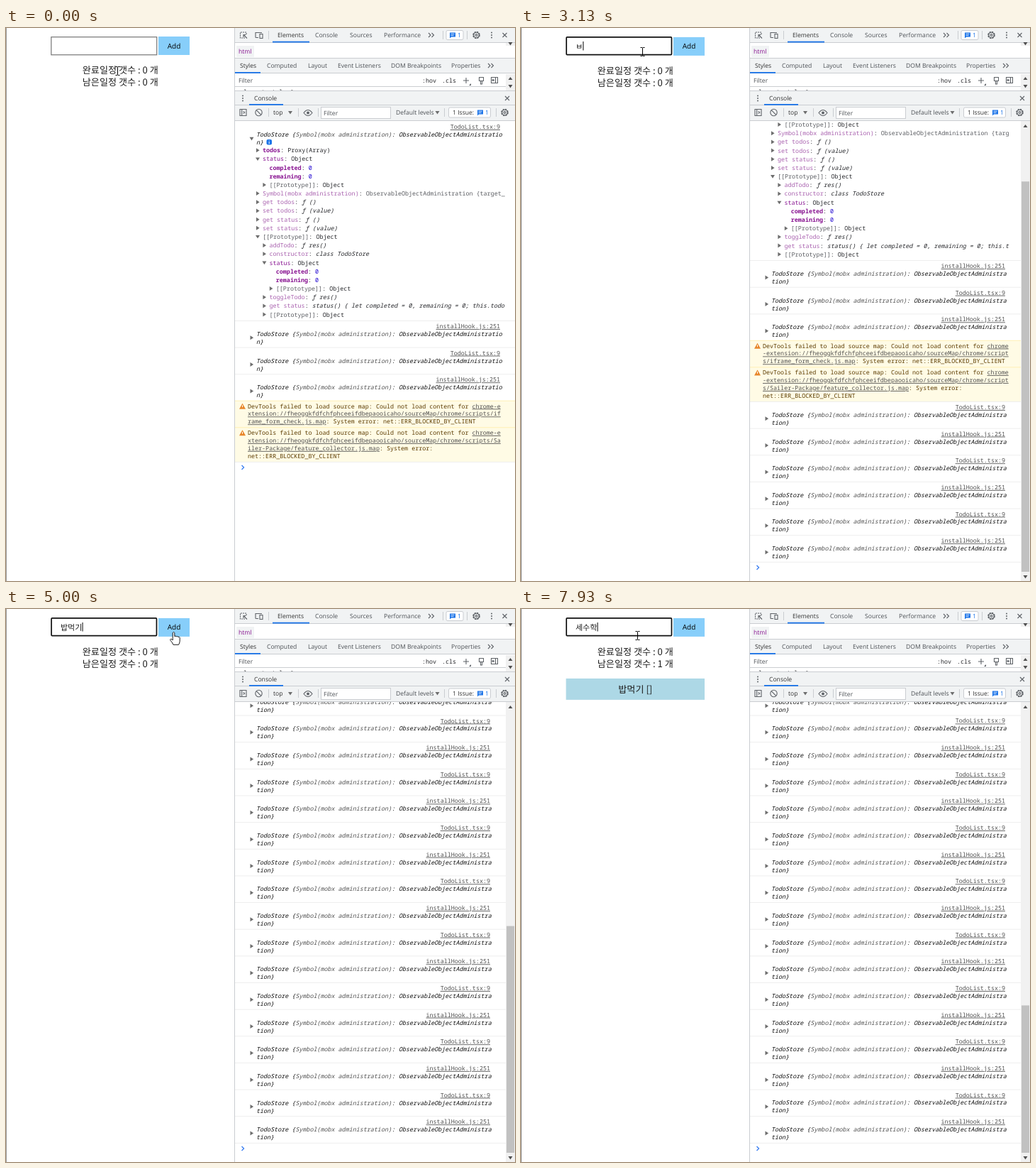
Animation, 718 px wide and 779 px high, one loop 8 s. Source, as an HTML page:

```html
<!DOCTYPE html>
<html lang="en">
<head>
<meta charset="utf-8">
<title>Todo list with console</title>
<style>
html, body { margin: 0; width: 100%; height: 100%; overflow: hidden; background: #fff; }
svg { display: block; }
text { white-space: pre; text-rendering: geometricPrecision; }
.ui { font: 8.6px "Open Sans", "Noto Sans", sans-serif; fill: #4d5156; }
.on { fill: #333; }
.mono { font: 8.38px "Noto Sans Mono", "DejaVu Sans Mono", monospace; fill: #26272b; }
.it { font-style: italic; fill: #111; }
.it .g { fill: #505050; }
.k { font-weight: 700; fill: #881391; }
.d { fill: #a962af; }
.p { fill: #881391; }
.g { fill: #5c5e63; }
.n { fill: #1c00cf; }
.i { font-style: italic; }
.a { text-decoration: underline; text-decoration-skip-ink: none; fill: #505050; }
.warn { fill: #5c3c00; }
.ko { font-family: "Noto Sans CJK KR", "Noto Sans CJK JP", "Noto Sans CJK SC", "Noto Sans CJK", sans-serif; font-weight: 350; fill: #1c1c1c; }
.ic { fill: none; stroke: #5f6368; stroke-width: 1.1; }
.hair { stroke: #cacdd1; stroke-width: 1; }
</style>
</head>
<body>
<svg id="stage" width="718" height="779" viewBox="0 0 718 779" xmlns="http://www.w3.org/2000/svg"></svg>
<script>
const LOG = 37.65, VIEW = 646, MAX_LOGS = 38;

const rect = (x, y, w, h, fill, more = '') =>
  `<rect x="${x}" y="${y}" width="${w}" height="${h}" fill="${fill}" ${more}/>`;
const text = (cls, x, cy, s, more = '') =>
  `<text class="${cls}" x="${x}" y="${cy + 3}" ${more}>${s}</text>`;
const line = (x1, y1, x2, y2, more = 'class="hair"') =>
  `<line x1="${x1}" y1="${y1}" x2="${x2}" y2="${y2}" ${more}/>`;
const icon = (d, more = '') => `<path class="ic" d="${d}" ${more}/>`;
const span = (cls, s) => `<tspan class="${cls}">${s}</tspan>`;
const END = 'text-anchor="end"', MID = 'text-anchor="middle"';

const right = (x, y) => `<path d="M${x - 2} ${y - 3}l4.6 3l-4.6 3z" fill="#6e6e6e"/>`;
const down = (x, y, c = '#6e6e6e') => `<path d="M${x - 3} ${y - 2}h6l-3 4.6z" fill="${c}"/>`;
const up = (x, y) => `<path d="M${x - 3} ${y + 2}h6l-3 -4z" fill="#505050"/>`;
const cross = (x, y) => icon(`M${x - 3} ${y - 3}l6 6m0 -6l-6 6`);
const more = (x, y) => [-3.5, 0, 3.5].map(d => `<circle cx="${x}" cy="${y + d}" r="1" fill="#5f6368"/>`).join('');
const chevrons = (x, y) => icon(`M${x - 4} ${y - 3}l3 3l-3 3m4.5 -6l3 3l-3 3`);
const gear = (x, y) =>
  `<circle class="ic" cx="${x}" cy="${y}" r="4.4" style="stroke-width:1.8;stroke-dasharray:2.3 1.15"/>` +
  `<circle class="ic" cx="${x}" cy="${y}" r="3.7"/><circle class="ic" cx="${x}" cy="${y}" r="1.4"/>`;
const bubble = (x, y) => `<path d="M${x - 4} ${y - 3.5}h8v6h-6l-2 2z" fill="#1a73e8"/>` +
  line(x - 2.5, y - 1.7, x + 2.5, y - 1.7, 'stroke="#fff" stroke-width=".8"') +
  line(x - 2.5, y + .4, x + 1.5, y + .4, 'stroke="#fff" stroke-width=".8"');

function header() {
  const label = (x, y, s, cls = 'ui') => text(cls, x, y, s);
  const seps = [[370, 10], [616, 10], [650, 10], [370, 119], [412, 119], [440, 119], [618, 119], [691, 119]];
  return rect(323, 0, 395, 20, '#f1f3f4') + line(323, 20.5, 718, 20.5) +
    rect(705, 21, 13, 4, '#f1f1f1') + down(711.5, 22, '#505050') +
    rect(325, 25, 25, 16, '#f1f3f4') + label(328, 33, span('p', 'html')) +
    line(323, 42.5, 718, 42.5) + rect(323, 43, 395, 20, '#f1f3f4') + line(323, 63.5, 718, 63.5) +
    rect(323, 89, 395, 41, '#f1f3f4') + line(323, 88.5, 718, 88.5) +
    line(323, 108.5, 718, 108.5) + line(323, 130.5, 718, 130.5) +
    seps.map(([x, y]) => line(x + .5, y - 6, x + .5, y + 6)).join('') +
    // main tabs
    icon('M337 14h-6.500v-8h8.500v3', 'stroke-dasharray="2 1"') + icon('M335 9.500l5 5m-5 -1.500v-3.500h3.500') +
    icon('M352 13.500v-7h9m-9 7h4') + rect(358, 8.500, 4, 6, 'none', 'class="ic"') +
    label(383, 10, 'Elements', 'ui on') + label(436, 10, 'Console') + label(485, 10, 'Sources') +
    label(533, 10, 'Performance') + chevrons(600, 10) + rect(376, 18.700, 52, 1.800, '#1a73e8') +
    rect(621, 3.500, 24, 13, '#fff', 'class="hair" rx="2"') + bubble(630, 10) +
    label(637, 10, '<tspan fill="#1a73e8">1</tspan>') + gear(663.500, 10) + more(685, 10) + cross(703.500, 10) +
    // sidebar tabs
    label(330, 53, 'Styles', 'ui on') + rect(323, 62, 36, 1.800, '#1a73e8') +
    label(368, 53, 'Computed') + label(426, 53, 'Layout') + label(468, 53, 'Event Listeners') +
    label(543, 53, 'DOM Breakpoints') + label(628, 53, 'Properties') + chevrons(684, 53) +
    // style filter
    label(328, 73.500, 'Filter') + line(323, 82.500, 705, 82.500) +
    label(587, 73.500, ':hov', 'mono') + label(615, 73.500, '.cls', 'mono') +
    icon('M645 74h8m-4 -4v8') + '<path d="M656 78v3h-3z" fill="#5f6368"/>' +
    icon('M667.500 69.500h6v5h-6zM669.500 75v4h2v-4') + icon('M684.500 69.500h9v8h-9zM690.500 69.500v8m-1.500 -4h-3m1.500 -1.500l-1.500 1.500l1.500 1.500') +
    rect(705, 65, 13, 23, '#f1f1f1') + up(711.500, 71) + down(711.500, 82, '#505050') +
    `<g clip-path="url(#peek)">${text('mono', 330, 90, 'element.style {')}</g>` +
    // drawer
    more(334, 99) + label(350, 99, 'Console', 'ui on') + rect(343, 107, 48, 1.800, '#1a73e8') + cross(707, 99) +
    icon('M330 114.500h9v9h-9zM332.700 114.500v9m2 -6l2 1.500l-2 1.500') +
    '<circle class="ic" cx="356.500" cy="119" r="4.700"/>' + icon('M353.200 115.700l6.600 6.600') +
    label(377, 119, 'top', 'ui on') + down(401, 119) +
    icon('M420 119.500q6 -8 12 0q-6 8 -12 0z') + '<circle cx="426" cy="119.500" r="2" fill="#5f6368"/>' +
    rect(444.500, 111.500, 98, 16, '#fff', 'class="hair"') + label(448, 119.500, 'Filter') +
    label(550, 119, 'Default levels') + down(608.500, 119) +
    rect(624.500, 112, 59, 14, '#fff', 'class="hair" rx="2"') + label(630, 119, '1 Issue:', 'ui on') +
    bubble(669, 119) + label(676, 119, '<tspan fill="#1a73e8">1</tspan>') + gear(703.500, 119);
}

// [level, arrow, content]; arrow: 0 none, 1 closed, 2 open
const treeRows = wide => {
  const num = s => span('k', s) + ': ' + span('n', '0');
  const proto = span('g', '[[Prototype]]') + ': Object';
  const fn = (name, s) => span('d', name) + ': ' + span('i', 'ƒ ' + s);
  const status = span('p', 'status') + ': Object';
  return [
    [0, 1, span('k', 'todos') + ': Proxy(Array)'],
    [0, 2, status], [1, 0, num('completed')], [1, 0, num('remaining')], [1, 1, proto],
    [0, 1, span('d', 'Symbol(mobx administration)') + ': ' +
      span('g', 'ObservableObjectAdministration {targ' + (wide ? 'et_' : ''))],
    [0, 1, fn('get todos', '()')], [0, 1, fn('set todos', '(value)')],
    [0, 1, fn('get status', '()')], [0, 1, fn('set status', '(value)')],
    [0, 2, proto],
    [1, 1, fn('addTodo', 'res()')],
    [1, 1, span('d', 'constructor') + ': ' + span('i', 'class TodoStore')],
    [1, 2, status], [2, 0, num('completed')], [2, 0, num('remaining')], [2, 1, proto],
    [1, 1, fn('toggleTodo', 'res()')],
    [1, 1, span('d', 'get status') + ': ' +
      span('i', 'status() { let completed = 0, remaining = 0; this.t' + (wide ? 'odo' : ''))],
    [1, 1, proto],
  ];
};

function store(y, wide, file, open) {
  const cut = wide ? 13 : 10, word = 'Administration';
  return text('mono a', wide ? 697 : 683, y + 7.7, file, END) +
    text('mono it', 353, y + 18.6, 'TodoStore {' + span('g', 'Symbol(mobx administration)') +
      ': ObservableObject' + word.slice(0, cut)) +
    text('mono it', 353, y + 29.6, word.slice(cut) + '}') +
    (open ? down(346.5, y + 24.5) : right(346.5, y + 24)) +
    (open ? '' : line(323, y + .2, wide ? 718 : 705, y + .2, 'stroke="#eee"'));
}

function warning(y, wide, path, rows) {
  const cols = wide ? 71 : 69, at = cols - 63, step = 10.9;
  const url = 'chrome-extension://fheoggkfdfchfphceeifdbepaooicaho/sourceMap/chrome/scripts/' + path;
  const end = 'net::ERR_BLOCKED_BY_CLIENT', h = rows === 4 ? 48.4 : LOG;
  const lines = [
    'DevTools failed to load source map: Could not load content for ' + span('a', url.slice(0, at)),
    span('a', url.slice(at, at + cols)),
    span('a', url.slice(at + cols)) + ': System error: ' + (rows === 4 ? '' : end),
    rows === 4 ? end : '',
  ];
  return rect(323, y, wide ? 395 : 382, h, '#fffbe5') + line(323, y, wide ? 718 : 705, y, 'stroke="#fff0b3"') +
    `<path d="M333.500 ${y + 3.5}l4.500 8h-9z" fill="#e8862a"/>` +
    line(333.5, y + 6, 333.5, y + 9, 'stroke="#fff"') +
    lines.map((s, i) => text('mono warn', 341, y + 7.3 + i * step, s)).join('');
}

function consoleLog(wide, count) {
  const name = i => i % 2 ? 'installHook.js:251' : 'TodoList.tsx:9';
  let out = store(131.3, wide, name(0), true) +
    rect(367.5, 157, 7.5, 7.5, '#1a73e8', 'rx="2"') + line(371.2, 160.2, 371.2, 163.2, 'stroke="#fff"') +
    line(371.2, 158.3, 371.2, 159.3, 'stroke="#fff"');
  treeRows(wide).forEach(([level, arrow, s], i) => {
    const y = 172.2 + i * 12.18, x = 362 + level * 9.4;
    out += text('mono', x, y, s) + [() => '', right, down][arrow](x - 7, y);
  });
  for (let i = 0; i < 3; i++) out += store(412.3 + i * LOG, wide, name(i + 1));
  out += warning(525.2, wide, 'iframe_form_check.js.map', 3) +
    warning(562.8, wide, 'Sailer-Package/feature_collector.js.map', 4);
  for (let i = 0; i < count; i++) out += `<g class="log">${store(611.2 + i * LOG, wide, name(i))}</g>`;
  return out + `<g class="prompt">${line(323, 611.4, wide ? 718 : 705, 611.4, 'stroke="#eee"')}` +
    '<path d="M332.500 616l3 3l-3 3" fill="none" stroke="#367cf1" stroke-width="1.300"/></g>';
}

const stage = document.getElementById('stage');
stage.innerHTML = `<defs>
  <clipPath id="view"><rect x="323" y="131" width="395" height="648"/></clipPath>
  <clipPath id="peek"><rect x="323" y="83" width="380" height="5"/></clipPath></defs>` +
  rect(0, 0, 718, 779, '#fff') + line(.5, 0, .5, 779, 'stroke="#999"') +
  '<rect id="box" fill="#fff"/>' + '<text id="typed" class="ko" x="77" y="29.500" font-size="11"/>' +
  '<rect id="caret" y="19" width="1" height="12.500"/>' +
  '<g id="page">' + rect(215, 12, 44, 26, '#87cefa') +
  text('ui', 237, 25.5, 'Add', MID + ' style="font-size:10px;fill:#000"') +
  text('ko', 161.3, 60.9, '완료일정 갯수 : 0 개', MID + ' font-size="13.1"') +
  `<text id="left" class="ko" x="161.3" y="80.900" font-size="13.1" ${MID}></text>` +
  '<g id="item">' + rect(63.500, 97, 195.500, 30, '#add8e6') +
  text('ko', 161.3, 113.9, '밥먹기 []', MID + ' font-size="13.1"') + '</g></g>' +
  line(322.500, 0, 322.500, 779) + header() +
  `<g clip-path="url(#view)"><g id="wide">${consoleLog(true, 3)}</g><g id="narrow">${consoleLog(false, MAX_LOGS)}</g></g>` +
  '<g id="bar">' + rect(705, 131, 13, 648, '#f1f1f1') + up(711.500, 138) + down(711.500, 773, '#505050') +
  '<rect id="thumb" x="706" width="11" fill="#c1c1c1"/></g>' +
  `<g id="beam"><path d="M-3 -6h2q1 0 1 1q0 -1 1 -1h2M0 -5v10M-3 6h2q1 0 1 -1q0 1 1 1h2" fill="none" stroke="#000"/></g>
  <g id="arrow"><path d="M0 0v14l3.300 -3l2.200 5l2.200 -1l-2.200 -4.800h4.500z" fill="#fff" stroke="#000" stroke-width=".9"/></g>
  <g id="hand"><path d="M-1.300 1q1.300 -2 2.600 0v5q1.300 -1 2.600 .3q1.400 -.7 2.500 .5q1.600 -.5 2.300 1v5q-.3 3 -1.700 5h-7.500q-2 -4 -4.500 -6.800q.5 -2 2.500 -.8l1.200 1.200z" fill="#fff" stroke="#000" stroke-width=".9"/></g>`;

const $ = id => document.getElementById(id);
const show = (el, on) => { el.style.display = on ? '' : 'none'; };

// [time, typed text, console entries added]
const edits = [
  [0, '', 0], [2600, 'ㅂ', 2], [2930, '', 3], [3000, '', 4], [3070, 'ㅂ', 5], [3130, 'ㅂ', 6],
  [3200, '바', 7], [3270, '바', 8], [3330, '밥', 9], [3400, '밥', 10], [3470, '밥ㅁ', 11],
  [3530, '밥ㅁ', 12], [3600, '밥머', 14], [3670, '밥먹', 16], [3730, '밥먹ㄱ', 17], [3800, '밥먹ㄱ', 18],
  [3870, '밥먹기', 20], [5130, '', 22], [7470, 'ㅅ', 24], [7530, '세', 26],
  [7670, '세수', 30], [7800, '세수ㅎ', 34], [7930, '세수학', 38],
];
// input looks: 0 idle, 1 hovered, 2 focused
const looks = [[0, 0], [1000, 1], [1330, 2], [5070, 0], [6000, 1], [6070, 2]];
const carets = [[0, 0], [1330, 1], [1870, 0], [2400, 1], [5070, 0], [6070, 1], [6600, 0], [7130, 1]];
const moves = [
  [0, 157, 60], [130, 170, 52], [270, 203, 63], [330, 208, 67], [470, 204, 67], [600, 204, 67],
  [800, 196, 83], [1000, 177, 36], [1130, 171, 32], [1330, 171, 32], [1400, 171, 33], [4470, 171, 33],
  [4800, 205, 27], [5000, 236, 32], [5200, 236, 33], [5270, 237, 33], [5470, 237, 33], [5670, 243, 78],
  [5800, 225, 100], [5930, 185, 58], [6000, 168, 40], [6070, 164, 37], [8000, 164, 37],
];
const at = (list, t) => list.findLast(e => e[0] <= t);

// the pointer is sampled 15 times a second
function pointer(t) {
  const q = Math.floor((t + 4) / (200 / 3)) * (200 / 3) + 3.4;
  const i = Math.max(1, moves.findIndex(m => m[0] > q));
  const [t0, x0, y0] = moves[i - 1], [t1, x1, y1] = moves[i];
  const f = (q - t0) / (t1 - t0);
  return [Math.round(x0 + (x1 - x0) * f) + .5, Math.round(y0 + (y1 - y0) * f) + .5];
}

function draw(t) {
  const [, typed, logs] = at(edits, t), look = at(looks, t)[1], added = t >= 5130;
  $('typed').textContent = typed;
  $('caret').setAttribute('x', 77.2 + typed.length * 10.12);
  show($('caret'), at(carets, t)[1]);
  $('page').setAttribute('transform', `translate(0 ${typed ? .9 : 0})`);
  $('left').textContent = `남은일정 갯수 : ${added ? 1 : 0} 개`;
  show($('item'), added);

  const width = look === 2 ? 1.7 : 1.2, box = {
    x: 63.2 + width / 2, y: 12.1 + width / 2, width: 150.1 - width, height: 26.3 - width, rx: look === 2 ? 1 : 0,
    stroke: ['#767676', '#333', '#101010'][look], 'stroke-width': width,
  };
  for (const k in box) $('box').setAttribute(k, box[k]);

  const scroll = Math.max(0, logs * LOG - 141), narrow = scroll > 0;
  show($('wide'), !narrow);
  show($('narrow'), narrow);
  show($('bar'), narrow);
  const panel = $(narrow ? 'narrow' : 'wide');
  panel.setAttribute('transform', `translate(0 ${-scroll})`);
  panel.querySelectorAll('.log').forEach((el, i) => show(el, i < logs));
  panel.querySelector('.prompt').setAttribute('transform', `translate(0 ${logs * LOG})`);
  const size = 622 * VIEW / (VIEW + scroll);
  $('thumb').setAttribute('y', 766 - size);
  $('thumb').setAttribute('height', size);

  const [x, y] = pointer(t);
  const onButton = x > 215 && x < 259 && y > 12 && y < 39, onItem = added && y > 97 && y < 127;
  const onText = x < 213 && (y < 39 || (y > 50 && y < 84));
  const kind = onButton || onItem ? 'hand' : onText ? 'beam' : 'arrow';
  for (const id of ['hand', 'beam', 'arrow']) show($(id), id === kind);
  $(kind).setAttribute('transform', `translate(${x} ${y})`);
}

let start;
function tick(now) {
  start ??= now;
  draw((now - start) % 8000);
  requestAnimationFrame(tick);
}
draw(0);
requestAnimationFrame(tick);
</script>
</body>
</html>
```
